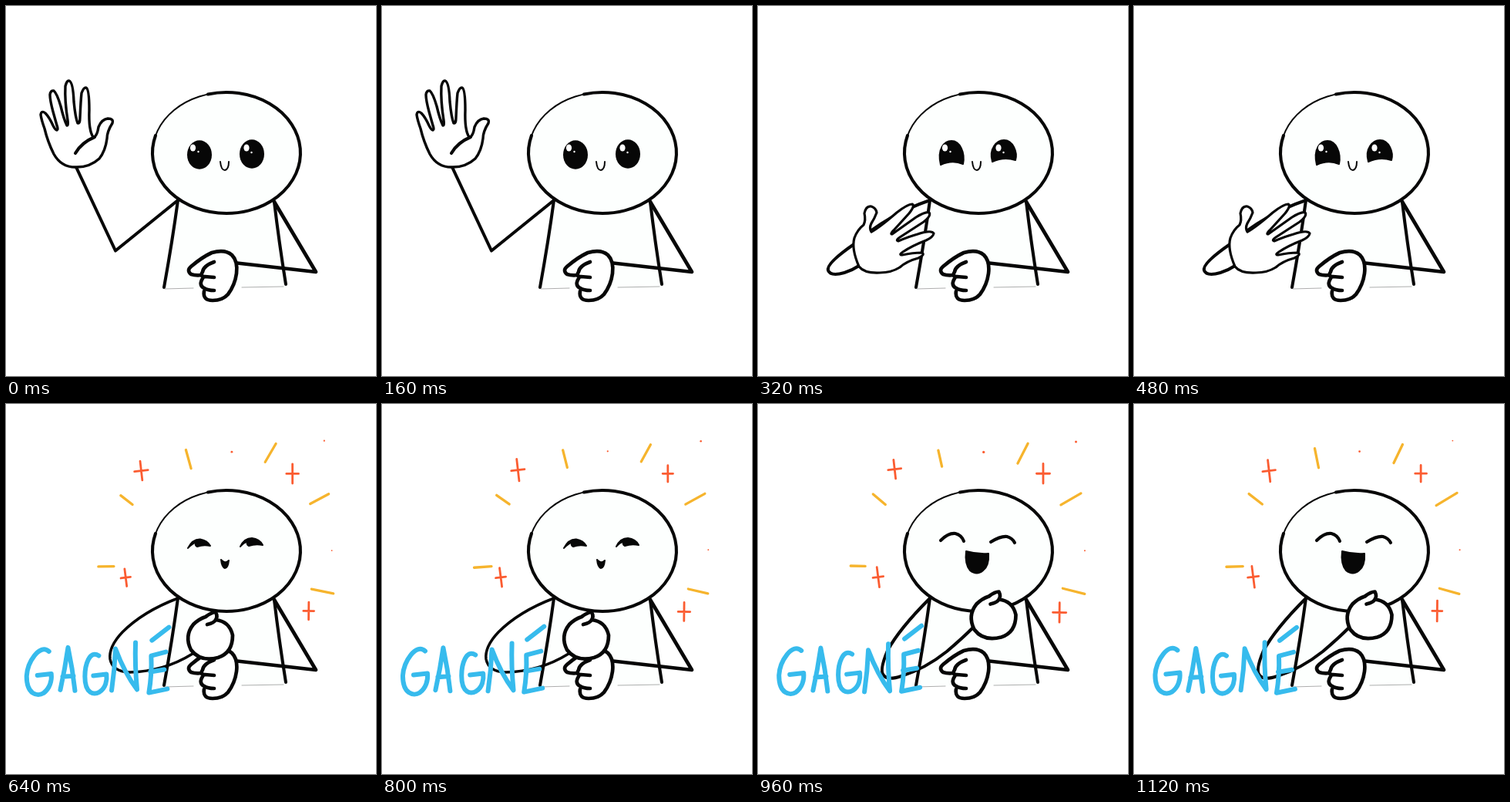
An HTML page for the animation above (1280 ms loop, 480 by 480 pixels).

```html
<!DOCTYPE html>
<html lang="fr">
<head>
<meta charset="utf-8">
<title>Gagné</title>
<style>
  html, body { margin: 0; width: 100%; height: 100%; overflow: hidden; background: #fff; }
  svg { display: block; width: 100%; height: 100%; }
  .ink { fill: none; stroke: #070707; stroke-width: 4.1; stroke-linecap: round; stroke-linejoin: round; }
  .skin { fill: #fdfffe; }
  .solid { fill: #070707; }
  .hand { fill: #fff; }
  .thin { stroke-width: 2; }
  .bold { stroke-width: 4.7; }
  .bare { stroke: none; }
  .hem { stroke: #777; stroke-width: 0.6; }
  .pose, .burst { visibility: hidden; animation: pose 1280ms step-end infinite; animation-delay: calc(var(--at) * 1ms - 1280ms); }
  .burst { animation-name: burst; }
  @keyframes pose { 0% { visibility: visible; } 25%, 100% { visibility: hidden; } }
  @keyframes burst { 0% { visibility: visible; } 12.5%, 100% { visibility: hidden; } }
  .burst path { fill: none; stroke-linecap: round; stroke-linejoin: round; }
  .letter { stroke: #37bbed; stroke-width: 6; }
  .ray { stroke: #f6b42d; stroke-width: 3.3; }
  .cross { stroke: #fb5c31; stroke-width: 2.8; }
  .dot { fill: #fb5c31; }
</style>
</head>
<body>
<svg viewBox="0 0 480 480" role="img" aria-label="GAGNÉ">
  <defs>
    <path id="thumb" d="M261 286Q270 284 272 280Q290 282 294 300Q294 323 275 329Q252 335 240 319Q231 301 243 286Q250 279 259 276Q267 270 272 270Q275 276 272 280"/>
    <g id="glints">
      <ellipse cx="242.500" cy="184" rx="3.600" ry="4.600"/>
      <circle cx="249.500" cy="189" r="1.200"/>
      <ellipse cx="312" cy="184" rx="3.600" ry="4.600"/>
      <circle cx="318.500" cy="190" r="1.200"/>
    </g>
    <path id="smile" d="M278 202Q279 213 284 213Q289 212 289 202"/>
  </defs>

  <g class="ink">
    <path class="skin bare" d="M223 252L205 366H363L348 254Z"/>
    <path d="M223 252Q216 304 205 365M348 254Q354 305 363 361"/>
    <path class="hem" d="M206 367L243 366M306 365L360 364"/>
    <path class="bold" d="M348 254L402 345L300 333.500"/>
    <ellipse class="skin thin" cx="286" cy="190.500" rx="96" ry="78.500"/>
    <path d="M262 114.500A96 78.500 0 1 1 194 168"/>
    <g class="bold">
      <path class="hand" d="M254 349Q246 350 240 348Q234 343 240 338Q254 326 267 320Q284 315 293 323Q301 331 299 347Q297 362 288 374Q281 382 268 382Q255 382 257 370"/>
      <path d="M270 332Q256 337 255 345Q251 351 258 351L270 352M256 352Q249 362 257 366Q262 369 270 369"/>
    </g>
  </g>

  <g class="pose ink" style="--at:0">
    <g class="solid bare">
      <ellipse cx="251" cy="193" rx="16" ry="18.800"/>
      <ellipse cx="319" cy="192" rx="16" ry="18.800"/>
    </g>
    <use href="#glints" class="hand bare"/>
    <use href="#smile" class="thin"/>
    <path d="M91 209L142 317.500L223 252"/>
    <path class="hand" style="stroke-width:3.400" d="M92 209Q72 210 62 192Q54 176 50 159Q46 148 45 141Q46 135 51 139Q56 144 61 155Q64 161 66 161Q68 160 66 155L61 137Q57 122 57 115Q58 109 62 110Q66 113 71 130Q75 147 79 155Q81 155 80 148Q76 123 77 104Q79 96 82 97Q87 99 88 124Q90 145 93 152Q96 153 96 145Q97 122 98 113Q101 105 104 106Q108 108 108 135Q107 161 113 170Q118 170 120 157Q124 147 132 146Q140 146 138 152Q131 163 131 172Q129 188 121 198Q109 209 92 209Z"/>
    <path d="M90 191Q98 177 115 170"/>
  </g>

  <g class="pose ink" style="--at:320">
    <path class="solid thin" d="M237 206C232 185 242 175 251 175C262 175 269 190 266 205Q252 199 237 206ZM304 202C299 185 310 174 319 174C331 174 337 190 334 200Q319 195 304 202Z"/>
    <use href="#glints" class="hand bare"/>
    <use href="#smile" class="thin"/>
    <path d="M223 252Q170 270 126 308Q88 334 91 343Q94 351 112 346Q122 343 131 337"/>
    <path class="hand" style="stroke-width:3.200" d="M131 338Q121 315 125 301Q129 290 137 284Q140 278 138 269Q140 259 147 260Q153 262 154 268Q151 276 147 282Q144 288 147 293Q158 287 180 268Q194 257 200 257Q204 259 196 269L176 291Q171 296 174 296Q188 286 205 274Q218 266 222 268Q225 272 215 280L184 300Q178 304 182 305Q196 299 207 296Q225 290 228 295Q227 300 218 304Q200 311 188 319Q182 323 187 323Q201 320 212 320Q218 322 208 327Q193 331 184 339Q173 346 158 346Q138 347 131 338Z"/>
  </g>

  <g class="pose ink" style="--at:640">
    <path class="solid thin" d="M236 187Q242 175 252 175.500Q261 177 265 184Q256 182 248 185Q244 183 247 179Q240 182 236 187ZM304 185Q309 174 319 174Q329 175 333 183Q324 181 315 184Q311 182 314 178Q308 180 304 185Z"/>
    <path class="solid thin" d="M279 202Q284 208 289 203Q288 213 284 213Q280 212 279 202Z"/>
    <path style="stroke-width:3.500" d="M223 252Q178 269 151 296Q133 315 135 331Q138 347 160 348Q205 347 242 324"/>
    <use href="#thumb" class="hand bold"/>
  </g>

  <g class="pose ink" style="--at:960">
    <path d="M237 177Q247 167 256 168Q264 170 267 178M302 179Q315 171 323 172Q330 174 333 180"/>
    <path class="solid thin" d="M270 191Q284 195 299 194Q300 210 292 216Q284 223 275 216Q268 207 270 191Z"/>
    <path d="M223 252Q183 292 168 320Q157 346 163 352Q168 359 186 353Q216 344 245 321Q265 304 279 290"/>
    <use href="#thumb" class="hand bold" transform="translate(40.500 -26.500)"/>
  </g>

  <g id="bursts"></g>
</svg>

<script>
const letters = [
  "M57 320C45 309 29 334 28 352C28 376 42 379 50 374C58 368 61 358 60 349L42 351",
  "M70 372Q76 345 80 317Q86 345 89 373M73 355L87 354",
  "M121 326C109 318 103 338 103 353C103 376 115 377 122 373C130 368 132 358 131 350L114 352",
  "M138 372Q142 345 143 318Q155 350 171 371Q168 340 169 310",
  "M207 321L188 326Q189 350 185 374L209 369M187 347L205 344M189 306L211 289"
];
const rays = [[157, 124], [237, 71], [343, 64], [406, 124], [410, 242], [130, 211]];
const crosses = [[176, 86], [371, 89], [155, 224], [392, 269]];
const dots = [[413, 48], [292, 62], [423, 190]];

// Seeded generator: returns a function giving a number in -amount..amount.
function wobbler(seed) {
  return amount => {
    seed = (seed * 16807) % 2147483647;
    return (seed / 2147483647 * 2 - 1) * amount;
  };
}

function drawBurst(index) {
  const wobble = wobbler(9973 * (index + 1));
  const move = (x, y, amount) => `translate(${x + wobble(amount)} ${y + wobble(amount)})`;

  const letter = d => `<path class="letter" d="${d}" transform="${move(0, 0, 1.5)}"/>`;

  // Rays point away from the head and grow longer towards the right.
  const ray = ([x, y]) => {
    const angle = Math.atan2(y - 206, x - 268) * 180 / Math.PI + wobble(4);
    const length = 17 + x / 35 + wobble(3);
    return `<path class="ray" d="M${-length / 2} 0h${length}" transform="${move(x, y, 1)} rotate(${angle})"/>`;
  };

  const cross = ([x, y]) => {
    const w = 15 + wobble(3), h = 25 + wobble(4);
    return `<path class="cross" d="M${-w / 2} 0h${w}M0 ${-h / 2}v${h}" transform="${move(x, y, 1.5)} rotate(${(x - 372) / 30})"/>`;
  };

  const dot = ([x, y]) => `<circle class="dot" r="${1.3 + wobble(0.4)}" transform="${move(x, y, 1)}"/>`;

  const parts = [letters.map(letter), rays.map(ray), crosses.map(cross), dots.map(dot)];
  return `<g class="burst" style="--at:${640 + 160 * index}">${parts.flat().join("")}</g>`;
}

document.getElementById("bursts").innerHTML = [0, 1, 2, 3].map(drawBurst).join("");
</script>
</body>
</html>
```
